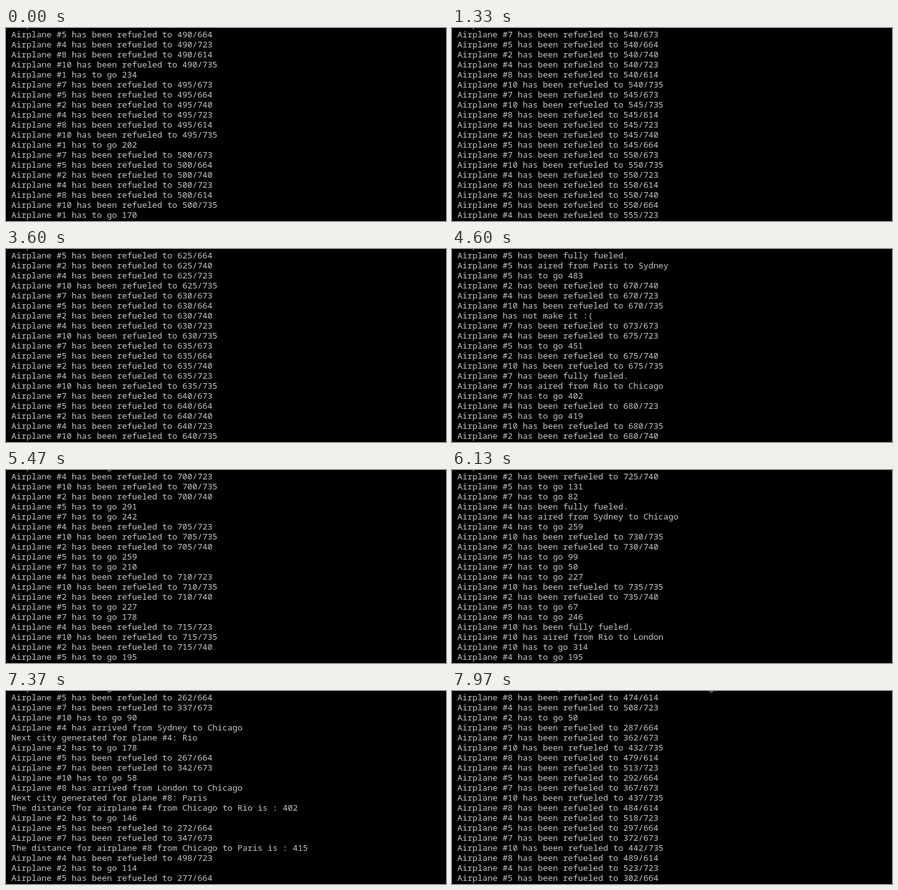
Write an HTML page that moves like this. It is 700 by 308 pixels and loops after 8 s.

```html
<!DOCTYPE html>
<html lang="en">
<head>
<meta charset="utf-8">
<title>Airplane log</title>
<style>
  html, body { margin: 0; width: 100%; height: 100%; overflow: hidden; background: #000; }
  pre {
    position: absolute; left: 8.5px; top: -14px; margin: 0;
    font: 13.3333px/16px "Noto Sans Mono", "DejaVu Sans Mono", monospace;
    font-variant-ligatures: none;
    color: #c8c8c4;
  }
</style>
</head>
<body>
<pre id="console"></pre>
<script>
const LOOP = 8000, STEPS = 240, ROWS = 20, SPEED = 32;

const fueling = (cap, go, from, to, next, distance, fuelLeft) =>
  ({ mode: 'fuel', fuel: 485, cap, go, from, to, next, distance, fuelLeft });

const planes = {
  1: { mode: 'fly', go: 266 },
  2: fueling(740, 370, 'Tokio', 'Paris', 'Sydney', 412, 380),
  4: fueling(723, 259, 'Sydney', 'Chicago', 'Rio', 402, 493),
  5: fueling(664, 483, 'Paris', 'Sydney', 'London', 377, 242),
  7: fueling(673, 402, 'Rio', 'Chicago', 'Tokio', 611, 317),
  8: fueling(614, 278, 'London', 'Chicago', 'Paris', 415, 464),
  10: fueling(735, 314, 'Rio', 'London', 'Chicago', 377, 427),
};

// [repeat, order in which planes report]; "@n" pins that report to time step n
const rounds = [
  [1, '7 2 5 4 8 10 1'],
  [1, '7 5 2 4 8 10 1'],
  [1, '7 5 2 4 8 10 1@0'],
  [4, '7 5 2 4 8 10 1'],
  [4, '7 5 2 4 8 10'],
  [1, '7 10 8 4 2 5'],
  [1, '7 10 4 8 2 5'],
  [1, '4@40 7 2 10 8 5'],
  [7, '4 7 2 10 8 5'],
  [1, '7 4 2 8 5 10'],
  [1, '7 4 2 8 10 5'],
  [1, '7@78 4 2 8 10 5'],
  [3, '7 4 2 8 10 5'],
  [9, '7 5 2 4 10'],
  [1, '7 5 2 4 10 lost'],
  [1, '7 4 5 2 10'],
  [1, '7 4 5 10 2@138 7'],
  [6, '4 10 2 5 7'],
  [1, '4 10 2 5@164 7'],
  [4, '4 10 2 5 7'],
  [2, '8 10 4 2 5'],
  [2, '5 7 8 10 4 2'],
  [1, '5 7 10 8 4 2'],
  [1, '5@202 7 10 8 4 2'],
  [7, '5 7 10 8 4 2'],
  [2, '5 7 10 8 4'],
  [1, '5@239'],
];

// Advances one plane by one round and returns the lines it prints.
function report(id) {
  if (id === 'lost') return ['Airplane has not make it :('];
  const p = planes[id], name = `Airplane #${id} has`;
  const route = `from ${p.from} to ${p.to}`;
  switch (p.mode) {
    case 'fuel':
      if (p.fuel < p.cap) {
        p.fuel = Math.min(p.cap, p.fuel + 5);
        return [`${name} been refueled to ${p.fuel}/${p.cap}`];
      }
      p.mode = 'fly';
      return [`${name} been fully fueled.`, `${name} aired ${route}`, `${name} to go ${p.go}`];
    case 'fly':
      p.go -= SPEED;
      if (p.go >= SPEED) return [`${name} to go ${p.go}`];
      p.mode = 'land';
      return [];
    case 'land':
      p.mode = 'plan';
      return [`${name} arrived ${route}`, `Next city generated for plane #${id}: ${p.next}`];
    case 'plan':
      p.mode = 'fuel';
      p.fuel = p.fuelLeft;
      return [`The distance for airplane #${id} from ${p.to} to ${p.next} is : ${p.distance}`];
  }
}

const log = [], pins = [];
let round = 0;
for (const [repeat, order] of rounds) {
  for (let r = 0; r < repeat; r++, round++) {
    order.split(' ').forEach((entry, i, all) => {
      const [id, step] = entry.split('@');
      const clock = round + i / all.length;
      for (const text of report(id)) log.push({ clock, text });
      if (step) pins.push({ step: +step, clock });
    });
  }
}

function clockAt(step) {
  const k = pins.findIndex(pin => pin.step >= step);
  if (k <= 0) return pins[0].clock;
  const a = pins[k - 1], b = pins[k];
  return a.clock + (b.clock - a.clock) * (step - a.step) / (b.step - a.step);
}

const screenText = document.getElementById('console');
let shown = -1;

function draw(now) {
  const step = Math.min(STEPS - 1, Math.floor((now % LOOP + 4) * STEPS / LOOP));
  if (step !== shown) {
    shown = step;
    const clock = clockAt(step) + 1e-6;
    const printed = log.filter(line => line.clock <= clock);
    screenText.textContent = printed.slice(-ROWS).map(line => line.text).join('\n');
  }
}

let start;
function tick(now) {
  start ??= now;
  draw(now - start);
  requestAnimationFrame(tick);
}
draw(0);
requestAnimationFrame(tick);
</script>
</body>
</html>
```
